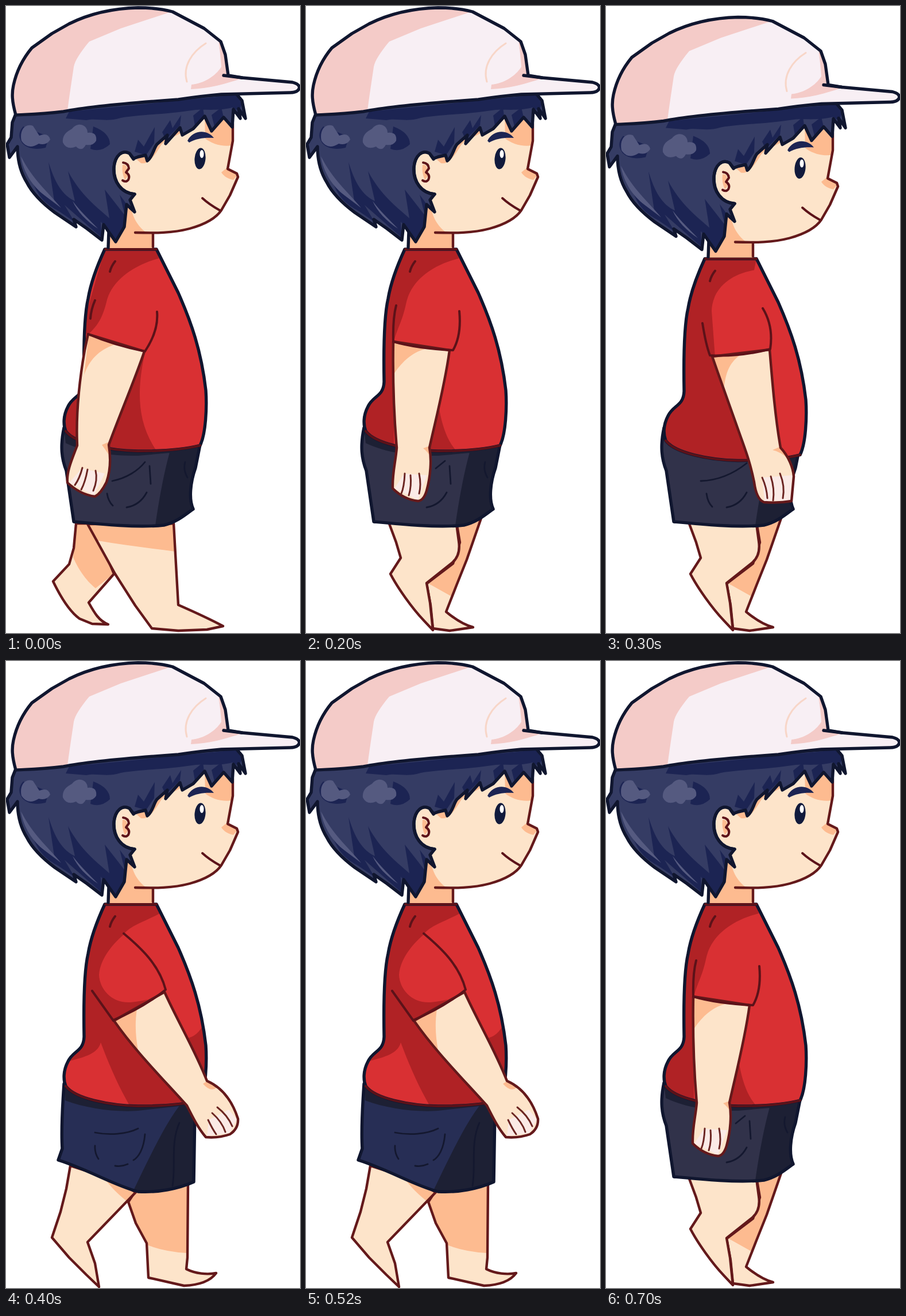
An HTML page for the animation above (800 ms loop, 512 by 1093 pixels).

```html
<!DOCTYPE html>
<html lang="en">
<head>
<meta charset="utf-8">
<title>Walking boy</title>
<style>
  html, body { margin: 0; width: 100%; height: 100%; overflow: hidden; background: #fff; }
  svg { display: block; width: 100%; height: 100%; }
  path { fill: none; stroke-linejoin: round; stroke-linecap: round; }
  .skin { fill: #fde4ca; }
  .peach { fill: #fdbb90; }
  .red { fill: #d93033; }
  .wine { fill: #b02225; }
  .slate { fill: #31324a; }
  .blue { fill: #272e55; }
  .night { fill: #1d2034; }
  .hair { fill: #353c64; }
  .deep { fill: #1c2453; }
  .mist { fill: #555a80; }
  .cap { fill: #f8eff4; }
  .pink { fill: #f4cbc8; }
  .pale { fill: #fbeae6; }
  .brown { stroke: #64191b; stroke-width: 4.4; }
  .seam { stroke: #5c1219; stroke-width: 4; }
  .thin { stroke: #6b2522; stroke-width: 3; }
  .navy { stroke: #10162f; stroke-width: 5.4; }
  .fold { stroke: #14182f; stroke-width: 2.8; }
</style>
</head>
<body>
<svg id="stage" viewBox="0 0 512 1093" preserveAspectRatio="none"></svg>
<script>
const p = (cls, d) => `<path class="${cls}" d="${d}"/>`;
const g = (body, attr = '') => `<g ${attr}>${body}</g>`;
// Filled shape with shading inside and its outline on top
const shape = (fill, line, d, shade = '') => p(fill, d) + shade + p(line, d);

const capD = 'M17 190C10 165 10 152 13 138C18 115 30 91 45 73L80 48L110 31C150 11 190 4 230 3' +
  'C258 3 275 6 290 10L345 39L374 62L382 85L387 121L411 125L499 133Q511 136 511 143Q508 151 495 151' +
  'L375 154C340 157 320 160 300 163C200 170 130 178 100 184C60 189 35 189 17 190Z';
const hairD = 'M17 188L11 203L9 229L2 241L6 264L20 245C20 270 26 291 36 307C46 327 65 345 85 360' +
  'L122 385L118 372L141 388L167 408L170 381L191 411L206 385L210 346L224 359L216 338L224 328' +
  'C200 326 186 305 188 281C190 260 203 251 215 257L222 266L230 263L243 260L246 270' +
  'C256 262 257 248 263 241L281 225L278 240L303 212L307 225L326 214L346 192L358 218L379 194' +
  'L394 211L396 180L408 196L405 179L417 196L411 165L401 153L200 165Z';
const faceD = 'M210 235L300 190L394 190L395 235L386 285L402 292L404 298L390 330L375 356' +
  'C365 371 345 381 320 388C290 396 260 396 225 395L214 360L200 320Z';

const head =
  p('peach', 'M180 380L257 380L257 422L178 422Z') +
  p('navy', 'M179 392L178 421') + p('brown', 'M256 397L256 420') +
  p('skin', faceD) +
  p('peach', 'M203 320L218 334C215 358 225 380 243 394L205 397Z' +
    'M214 255L250 260L263 240L281 222L303 209L320 212C292 231 275 232 268 246C255 267 246 276 235 274Z' +
    'M346 195L395 195L394 243C376 246 358 240 347 231Z' +
    'M386 281L403 295L396 303C388 302 379 297 375 290Z') +
  p('brown', 'M395 205L395 235L386 284L402 292L404 298L390 330L375 356C365 371 345 381 320 388C290 396 260 396 225 395') +
  p('seam', 'M342 335Q354 346 372 356') +
  shape('hair', 'navy', hairD,
    p('deep', 'M110 184L400 155L411 170L406 183L394 177C370 183 350 180 331 181C270 190 235 189 200 195' +
      'C176 203 158 195 140 199L104 196Z' +
      'M152 210Q181 221 181 241Q165 256 147 249ZM30 210Q17 224 29 240Q42 253 69 247L75 228Z') +
    p('deep', 'M46 306C57 335 72 347 91 357L119 376L102 347L143 383L166 403L165 376L190 408L205 385L209 344' +
      'L198 329L207 365L172 320L180 370C160 352 130 330 108 288L120 340C98 330 85 308 74 272L84 340C70 334 55 322 46 306Z') +
    p('deep', 'M244 260L224 254L230 233L240 245L259 211L258 239ZM278 233L272 220L286 199L290 213L305 190L303 208Z' +
      'M345 192L329 209L326 191L343 177ZM379 194L363 210L358 190L375 177Z') +
    p('mist', 'M27 235C23 216 34 204 47 209L58 226Q74 220 77 233Q70 244 57 240Q38 252 27 235Z' +
      'M99 238C98 222 109 218 115 214C125 201 142 207 142 221Q159 219 157 235Q152 244 139 242' +
      'Q132 255 122 245Q106 252 99 238Z') +
    p('mist', 'M26 262C30 290 47 315 67 330L96 352C73 324 46 302 26 262ZM116 340C124 358 140 375 160 388C146 373 132 361 116 340Z')) +
  p('skin', 'M222 324C203 325 190 307 191 282C193 260 204 251 216 258C222 264 224 274 225 285L232 312Z') +
  p('navy', 'M224 328C201 326 187 307 188 281C190 260 203 250 215 257L222 267') +
  p('peach', 'M203 277Q211 275 211 287Q215 296 207 303Q201 290 203 277Z') +
  p('seam', 'M204 273Q213 274 214 283L209 290Q217 295 213 303Q209 308 203 304') +
  '<ellipse cx="338" cy="266" rx="9.5" ry="18.5" fill="#111a3c" transform="rotate(5 338 266)"/>' +
  '<ellipse cx="341" cy="258" rx="3.5" ry="7" fill="#fff"/>' +
  p('deep', 'M316 235C325 216 350 214 362 230C346 229 331 231 319 238Z') +
  shape('cap', 'navy', capD,
    p('pink', 'M17 190C10 165 10 152 13 138C18 115 30 91 45 73L80 48L110 31C150 11 190 4 230 3L265 5L285 11' +
      'L200 39L145 62C130 80 120 95 118 106C113 140 110 160 107 183Q60 189 17 190Z' +
      'M370 60L376 66L382 85L387 121L411 126C382 136 352 144 322 145L323 137C345 135 365 122 375 106C374 90 372 75 370 60Z')) +
  p('navy', 'M379 121L411 125') +
  '<path d="M348 65C324 80 307 105 315 132" stroke="#f8d6c8" stroke-width="3"/>';

const torsoD = 'M172 424C160 450 148 480 143 510C136 540 135 600 136 655C135 681 117 679 108 698' +
  'C99 715 100 731 104 741C120 763 180 775 230 776C270 776 310 773 338 766C348 746 350 700 348 670' +
  'C340 600 322 550 300 500L262 424Z';
const torso = shade =>
  shape('red', 'navy', torsoD, g(shade, 'clip-path="url(#torso)"')) +
  p('seam', 'M173 424L262 424M104 741C120 763 180 775 230 776C270 776 310 773 338 766M190 445Q183 454 181 463');

const shortsD = 'M101 735C94 768 97 790 105 810L118 899C160 903 230 910 275 905C300 899 315 884 326 877' +
  'C318 860 321 830 330 805L338 765Z';
const shorts = folds =>
  shape('slate', 'navy', shortsD,
    p('night', 'M288 768C278 800 268 850 260 906L275 905C300 899 315 884 326 877C318 860 321 830 330 805L338 765Z' +
      'M101 737L104 762C140 779 180 784 230 784L330 775L330 765Z')) +
  p('fold', 'M245 848C236 865 222 872 210 874M312 795Q308 808 316 822' + folds);

const arm = (d, shade, hand, fingers) =>
  shape('skin', 'brown', d, p('peach', shade) + p('pale', hand)) + p('thin', fingers);

const legs = {
  stride:
    shape('skin', 'brown', 'M122 902L118 945L110 973L82 1003C95 1030 110 1055 128 1068L150 1077L178 1078C162 1072 154 1058 144 1040L188 990L152 902Z',
      p('peach', 'M122 902L150 902L187 990L156 1015C143 1005 127 985 117 961Z')) +
    shape('skin', 'brown', 'M142 903L190 990L225 1045L254 1085L300 1089L350 1087L378 1081C350 1066 325 1055 300 1044L292 902Z',
      p('peach', 'M142 903L292 902L295 951C250 945 205 940 160 932Z')),
  pass:
    shape('skin', 'brown', 'M262 900L268 935L256 972L210 1007L217 1045L221 1085L250 1089L291 1083C272 1078 256 1066 244 1056L262 1010L280 965L306 890Z',
      p('peach', 'M262 900L306 890L280 965L253 1029L212 1006L256 972L268 935Z')) +
    shape('skin', 'brown', 'M144 900L157 935L165 962L147 990C160 1015 185 1050 205 1071L221 1088L216 1040L210 1006L254 971C266 961 268 946 266 933L262 903Z'),
  back:
    shape('skin', 'brown', 'M213 943L228 920L317 908L316 1040L314 1060C330 1068 350 1070 366 1067C355 1082 335 1088 310 1089L248 1075L245 1015L226 980Z',
      p('peach', 'M213 943L228 920L317 908L315 1032Q277 1030 246 1018L226 980Z')) +
    shape('skin', 'brown', 'M112 880L105 920L95 960L80 1005L110 1040L140 1070L162 1091L155 1050L142 1013L226 926L190 905Z',
      p('peach', 'M172 903L227 925L211 942C195 930 183 917 172 903Z'))
};

const pocket = 'M250 802L252 833';

const poses = {
  swingBack:
    legs.stride + shorts(pocket + 'M185 828C210 823 230 810 242 795M176 850Q178 863 186 871') +
    torso(p('wine', 'M172 424L262 424L266 440C220 452 185 480 176 512C168 545 160 556 144 572L130 570Z' +
      'M243 600C228 665 226 725 264 778L90 778L90 700L150 660Z')) +
    arm('M143 572L241 602C225 650 195 720 179 765C183 790 182 810 175 830Q165 850 155 855Q130 852 107 831C105 812 115 790 124 766C121 700 130 640 137 600Z',
      'M144 574L190 590C160 600 145 618 136 643ZM167 765L179 760L179 782Q172 772 167 765Z',
      'M132 806L172 815L153 853L110 831Z',
      'M133 805Q128 824 120 835M142 808Q138 830 131 843M156 810Q160 826 152 845') +
    p('seam', 'M143 572Q190 592 242 602Q266 566 263 533M155 513Q148 529 147 545') + head,

  mid:
    legs.pass + shorts(pocket + 'M226 806L242 793') +
    torso(p('wine', 'M172 424L262 424L266 440C212 454 181 484 174 520C168 548 160 560 153 584L153 778L90 778L120 500Z' +
      'M246 610L232 703C239 740 249 762 264 778L205 778Z')) +
    arm('M152 585L250 600C242 660 226 720 215 770C219 790 217 820 210 845Q205 862 195 863Q170 860 151 841C150 815 156 795 158 770C152 700 151 640 152 585Z',
      'M153 586L215 596C185 602 168 620 154 640ZM204 771L215 767L217 786Q211 776 204 771Z',
      'M171 815L211 818L195 861L154 841Z',
      'M172 815Q171 838 166 850M182 818Q184 837 179 853M197 815Q201 835 197 850') +
    p('seam', 'M152 585Q193 597 256 600Q271 574 267 532M157 522Q151 545 152 585') + head,

  forward:
    legs.pass + shorts('M165 828C195 827 220 817 245 797M175 850Q177 865 185 873') +
    g(torso(p('wine', 'M172 424L262 424L258 444C212 452 185 480 184 515L190 596L250 778L90 778L120 500Z')) + head,
      'transform="translate(0 16.5)"') +
    arm('M185 611L285 599C290 660 295 720 304 770C318 785 326 805 327 820L323 863Q300 867 275 865Q262 860 258 830C252 800 245 780 236 755C220 710 202 660 185 611Z',
      'M186 612L238 606C216 618 208 640 206 664ZM290 774L304 768L318 790Q304 777 290 774Z',
      'M272 822L324 818L321 862L276 863Z',
      'M272 822Q280 840 281 858M287 820Q294 842 291 862M303 815Q312 837 308 858') +
    p('seam', 'M181 609Q232 612 286 598Q292 558 273 527M168 553Q174 591 181 609'),

  reach:
    legs.back +
    shape('blue', 'navy', 'M101 737C98 780 96 820 98 850L91 870C140 885 190 915 230 925C265 927 300 920 327 908L329 785L320 765Z',
      p('night', 'M308 768C282 798 252 860 222 923C265 927 300 920 327 908L329 785ZM101 737L103 766C140 780 190 787 230 784L310 775Z')) +
    p('fold', 'M155 822C180 827 210 825 230 815M242 825C240 850 231 865 222 870M155 845Q154 857 161 868M190 880Q201 882 212 877M302 805C286 840 296 880 290 915') +
    torso(p('wine', 'M172 424L262 424L268 440C240 455 215 462 205 477C184 495 164 520 162 547C163 572 184 597 217 595Q235 593 247 590' +
      'L188 627L325 778L217 778C195 740 180 705 165 665C160 684 139 690 108 698L120 500Z' +
      'M318 657Q338 652 349 622L354 740Z')) +
    arm('M188 627L276 577C300 630 330 680 350 732C380 745 395 770 404 798Q405 815 390 825Q370 832 348 830C335 815 325 795 315 775C270 725 225 680 188 627Z',
      'M189 628L228 606C224 635 226 655 230 679ZM343 737L351 732L367 743Q357 753 343 737Z',
      'M353 800L388 782L402 799L389 823L350 828Z',
      'M352 800Q359 815 366 825M359 788Q376 803 382 821M368 778Q386 792 394 811') +
    p('seam', 'M205 475C235 500 267 530 278 573Q238 605 187 626M150 575L187 627') + head
};

const stage = document.getElementById('stage');
stage.innerHTML = `<defs><clipPath id="torso"><path d="${torsoD}"/></clipPath></defs>` +
  Object.entries(poses).map(([name, body]) => g(body, `id="${name}" visibility="hidden"`)).join('');

// Pose and the time at which it ends, in ms
const steps = [['swingBack', 200], ['mid', 300], ['forward', 400], ['reach', 600], ['forward', 700], ['mid', 800]];
let shown;

function draw(ms) {
  const t = ms % 800;
  const name = steps.find(step => t < step[1])[0];
  if (name === shown) return;
  if (shown) document.getElementById(shown).setAttribute('visibility', 'hidden');
  document.getElementById(name).setAttribute('visibility', 'visible');
  shown = name;
}

const start = performance.now();
function tick() {
  draw(performance.now() - start);
  requestAnimationFrame(tick);
}
tick();
</script>
</body>
</html>
```
